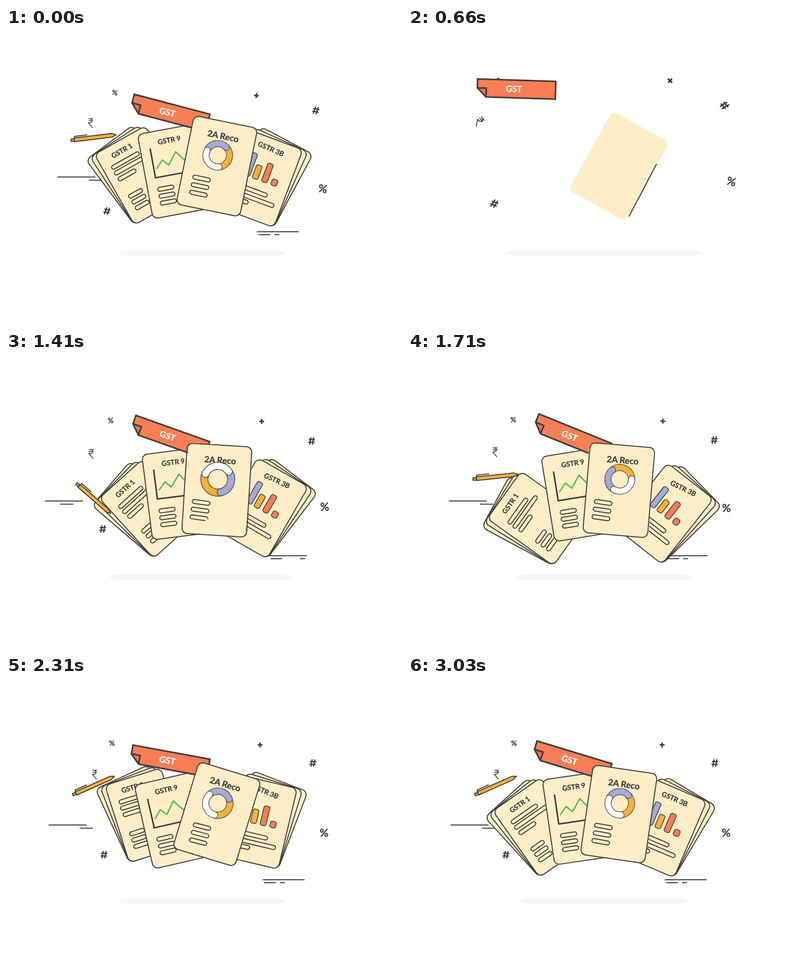
These frames come from a looping animation (800x600 px, 3.06 s). An HTML page:

```html
<!DOCTYPE html>
<html lang="en">
<head>
<meta charset="utf-8">
<title>GST returns</title>
<style>
  html, body { margin: 0; width: 100%; height: 100%; overflow: hidden; background: #fff; }
  svg { display: block; width: 800px; height: 600px; color: #3a3a3a; }
  text { font-family: Lato, "Open Sans", sans-serif; font-weight: 700; text-anchor: middle;
    fill: currentColor; stroke: currentColor; stroke-width: .3px; }
  .line { fill: none; stroke: #3d3d3d; stroke-width: 2; stroke-linecap: round; stroke-linejoin: round; }
  .card { fill: #feeec7; stroke: #3d3d3d; stroke-width: 2; }
</style>
</head>
<body>
<svg id="stage" viewBox="0 0 800 600"></svg>
<script>
const LOOP = 3060, STEP = 30;
const INK = '#3d3d3d', CREAM = '#feeec7', CORAL = '#f97e55', AMBER = '#f9b034', LILAC = '#a5a9d4', GREEN = '#55b95f';

const clamp = v => Math.max(0, Math.min(1, v));
const span = (t, start, length) => clamp((t - start) / length);
const remain = (t, start, length) => (1 - span(t, start, length)) ** 2;
const smooth = p => (1 - Math.cos(Math.PI * p)) / 2;
const backOut = p => 1 + 3.1 * (p - 1) ** 3 + 2.1 * (p - 1) ** 2;

// Damped swing: starts at full size and turns round every `half` ms.
function swing(t, start, size, half, decay) {
  const age = Math.max(0, t - start);
  return size * Math.exp(-age / decay) * Math.cos(Math.PI * age / half);
}

// Pose of a part whose corner lies at (dx, dy) from a pivot when turned by `base` degrees.
function around(px, py, dx, dy, base, angle) {
  const a = (angle - base) * Math.PI / 180, c = Math.cos(a), s = Math.sin(a);
  return [px + dx * c - dy * s, py + dx * s + dy * c, angle];
}

const group = (id, body) => `<g id="${id}">${body}</g>`;
const label = (s, x, y, size, extra = '') =>
  `<text x="${x}" y="${y}" dy=".35em" font-size="${size}" ${extra}>${s}</text>`;
const box = (x, y, w, h, r, attrs) => `<rect x="${x}" y="${y}" width="${w}" height="${h}" rx="${r}" ${attrs}/>`;

function pill(x, y, w, id = '') {
  const r = 4, l = x - w / 2, e = x + w / 2;
  return `<path id="${id}" class="line" pathLength="1" d="M${e} ${y}A${r} ${r} 0 0 0 ${e - r} ${y - r}
    H${l + r}A${r} ${r} 0 0 0 ${l + r} ${y + r}H${e - r}A${r} ${r} 0 0 0 ${e} ${y}"/>`;
}
const threePills = (x, y, gap, w, id) => [0, 1, 2].map(i => pill(x, y + gap * i, w, id ? id + i : '')).join('');

function ringArc(color, from, to) {
  const at = a => [23.7 * Math.cos(a * Math.PI / 180), 23.7 * Math.sin(a * Math.PI / 180)].join(' ');
  const d = `M${at(from)}A23.7 23.7 0 0 1 ${at(to)}`;
  const stroke = (c, w) => `<path d="${d}" fill="none" stroke="${c}" stroke-width="${w}" stroke-linecap="round"/>`;
  return stroke('#4c4a50', 14) + stroke(color, 11.4);
}

// Three sheets fanned about a shared bottom corner.
function pile(x, h, turn, body) {
  return [2, 1, 0].map(i =>
    `<g transform="rotate(${turn * i})">${box(x, -h, 118, h, 11, 'class="card"')}</g>`).join('') + body;
}

const bar = (x, h, color) =>
  box(x - 6, -79 - h, 12, h, 3.5, `fill="${color}" stroke="${INK}" stroke-width="1.6"`);

const hash = `<path class="line" style="stroke-width:2.5;stroke-linecap:butt"
  d="M-1.5 -7.5L-4 7.5M4 -7.5L1.5 7.5M-6 -2.7H6.8M-6.8 2.7H6"/>`;
const plus = `<path class="line" style="stroke-width:3;stroke-linecap:butt" d="M-5 0H5M0 -5V5"/>`;
const percent = size => label('%', 0, 0, size);

// Each symbol floats along (dx, dy) after it has arrived at (x, y).
const symbols = [
  { art: percent(14.5), x: 211, y: 139, dx: 9, dy: -8 },
  { art: plus, x: 517, y: 141, dx: -11, dy: -4 },
  { art: hash, x: 617, y: 181, dx: 9, dy: -14 },
  { art: percent(22), x: 644, y: 314, dx: -4, dy: 12 },
  { art: hash, x: 195, y: 358, dx: 9, dy: 13 }
];

const longPile = pile(0, 164, -3.6,
  label('GSTR 1', 52, -143.5, 14) +
  pill(48.5, -122.5, 63) + pill(55.5, -109.5, 79) + pill(37, -95.5, 40) +
  threePills(33.5, -54.5, 13.5, 31));

const barPile = pile(-118, 168, 3.8,
  group('barTitle', label('GSTR 3B', 0, 0, 14)) +
  bar(-88, 49, LILAC) + bar(-70.5, 29, AMBER) + bar(-50.5, 40, CORAL) + bar(-30.5, 13, CORAL) +
  pill(-70, -55.5, 70) + pill(-60, -40.5, 90) + pill(-85, -28.5, 38));

const chartCard = box(0, -174, 131, 174, 11, 'class="card"') +
  label('GSTR 9', 61, -151, 14) +
  `<path id="axis" class="line" style="stroke-width:3" pathLength="1" d="M20 -140V-81H90"/>
   <path id="graph" class="line" style="stroke:${GREEN};stroke-width:2.8" pathLength="1"
     d="M26 -99L40 -114L51 -101.5L69.5 -125.5L86 -103"/>` +
  threePills(36.5, -56.5, 14.2, 33);

const ribbon = `<path fill="${CORAL}" d="M-79 -18H79V18H-61L-79 0Z"/>
  <path fill="#e9734f" d="M-79 0H-61V18Z"/>
  <path fill="none" stroke="${INK}" stroke-width="3.2" d="M-79 -18H79V18H-61L-79 0ZM-79 0H-61V18"/>` +
  label('GST', -5, 0, 17.5, 'color="#fff"');

const pen = `<g stroke="${INK}" stroke-width="2" stroke-linejoin="round" fill="${AMBER}">
  <path d="M-46 -2.5H-39V2.5H-46Z"/><path d="M-39 -3.7H37L46 0L37 3.7H-39Z"/>
  <path fill="none" d="M-38 -3.7V-7H-12"/></g>`;

const stage = document.getElementById('stage');
stage.innerHTML =
  box(0, 450, 0, 12, 0, 'id="shadow" fill="#f6f6f6"') +
  `<path id="leftLines" class="line"/><path id="rightLines" class="line"/>` +
  symbols.map((s, i) => group('symbol' + i, s.art)).join('') +
  group('longPile', longPile) + group('barPile', barPile) + group('chartCard', chartCard) +
  group('ribbon', ribbon) +
  group('frontFill', box(-65.5, -91.5, 131, 183, 11, `fill="${CREAM}"`)) +
  group('frontTitle', label('2A Reco', 0, 0, 17.5)) +
  group('ring', ringArc(AMBER, -45, 85) + ringArc(LILAC, -150, -42) + ringArc('#fff', 84, 206)) +
  group('frontPills', threePills(0, -15.7, 15.7, 36, 'frontPill')) +
  group('frontEdge', `<path id="edge" class="line" pathLength="1" d="M65.5 80.5V-80.5A11 11 0 0 0 54.5 -91.5
    H-54.5A11 11 0 0 0 -65.5 -80.5V80.5A11 11 0 0 0 -54.5 91.5H54.5A11 11 0 0 0 65.5 80.5"/>`) +
  group('pen', pen) +
  group('rupee', `<path class="line" style="stroke-width:1.7;stroke-linecap:butt"
    d="M-4.5 -9H5M-4.5 -5H5M-4.5 -9H-1.5A4 4 0 0 1 -1.5 -.8H-4.5L4 9.5"/>`) +
  box(0, 597, 800, 3, 0, 'fill="#fff"');

const el = {};
stage.querySelectorAll('[id]').forEach(node => { if (node.id) el[node.id] = node; });

function place(id, [x, y, angle = 0], scale = 1) {
  el[id].setAttribute('transform', `translate(${x} ${y}) rotate(${angle}) scale(${scale})`);
}
function show(id, on) { el[id].setAttribute('visibility', on ? 'inherit' : 'hidden'); }
function draw(id, p) {
  show(id, p > 0);
  el[id].setAttribute('stroke-dasharray', p < 1 ? `${p} 2` : 'none');
}
function enter(id, t, start, pose) {
  show(id, t >= start);
  place(id, pose);
}
function flyOut(id, t, start, x, y, angle) {
  const p = span(t, start, 420), k = backOut(p);
  show(id, p > 0);
  place(id, [430 + (x - 430) * k, 380 + (y - 380) * k, angle + 90 * (1 - p)], Math.max(0, k));
}

function frontPose(t, sway) {
  const angle = 11.5 + sway * swing(t, 760, 14, 800, 1700) + .022 * Math.max(0, 760 - t);
  return [426, 740 - 460 * smooth(span(t, 90, 480)), angle];
}

function drawFront(t, sway) {
  const pose = frontPose(t, sway), angle = pose[2];
  enter('frontFill', t, 90, frontPose(t < 600 ? t : Math.max(600, t - 80), sway));
  place('frontEdge', pose);
  draw('edge', span(t, 570, 460));
  place('frontTitle', [430 + .75 * angle, 219.5, angle], span(t, 1050, 270));
  place('frontPills', [392, 320.5, 6 + angle / 2]);
  for (let i = 0; i < 3; i++) draw('frontPill' + i, span(t, 950 + 35 * i, 430));

  const pulse = Math.sin(Math.PI * span(t, 2100, 900));
  const size = t > 1000 ? backOut(span(t, 1000, 770)) + .05 * pulse : 0;
  place('ring', [427.8, 258, 360 * smooth(span(t, 1000, 1050)) + 32 * pulse], Math.max(0, size));
}

function drawCards(t, sway) {
  const tilt = -10.5 - sway * swing(t, 620, 4, 800, 4000) + 45 * remain(t, 690, 300);
  const behind = 1 - smooth(span(t, 990, 360));
  enter('chartCard', t, 690, around(400 + 32 * behind, 366 + 6 * behind, -103, 20, -10, tilt));
  draw('axis', span(t, 750, 480));
  draw('graph', span(t, 850, 440));

  const left = -29.5 + sway * swing(t, 950, 53.6, 740, 1000);
  enter('longPile', t, 1050, around(353 + 100 * remain(t, 1050, 700), 340, -96, 55, -27, left));
  const right = 20.5 - sway * swing(t, 930, 42, 770, 900);
  enter('barPile', t, 1050, around(444 - 100 * remain(t, 1050, 350), 328, 92, 82, 24, right));
  place('barTitle', [-61, -147, (24 - right) * .85]);
}

function drawFlyers(t, sway) {
  const angle = 14.8 - sway * swing(t, 880, 13, 780, 1500);
  enter('ribbon', t, 390, [331 - 370 * remain(t, 390, 600), 172 - 110 * remain(t, 390, 800), angle]);

  const turn = remain(t, 1140, 900), away = 600 * Math.max(0, turn - .49) ** 2;
  enter('pen', t, 1140,
    [177 - away, 222 + 75 * Math.sin(Math.PI * turn) - 2 * away, -7 - 17 * sway + 133 * turn]);
}

function drawBackdrop(t, sway) {
  const afloat = span(t, 1300, 700), drift = 1 - sway * (1 - .33 * afloat);
  symbols.forEach((s, i) =>
    flyOut('symbol' + i, t, 310 + 40 * ((i + 2) % 5), s.x + s.dx * drift, s.y + s.dy * drift, 10 * drift * drift));
  const lift = sway * afloat;
  flyOut('rupee', t, 480, 171 + 8 * lift, 193 + 15 * sway - 8 * lift, 0);

  const half = 198 * span(t, 300, 300) - 29 * span(t, 990, 1050);
  Object.entries({ x: 396 - half, width: 2 * half, rx: half * .15, ry: 6 })
    .forEach(([name, v]) => el.shadow.setAttribute(name, v));

  const far = delay => 322 * remain(t, 840 + delay, 570);
  const left = 78 + 27 * drift, right = 525 - 17 * drift;
  show('leftLines', t > 840);
  el.leftLines.setAttribute('d', `M${left - far(0)} 302h75M${left + 63 - far(180)} 308.5h25`);
  show('rightLines', t > 840);
  el.rightLines.setAttribute('d',
    `M${right + far(0)} 413h83M${right + 3 + far(90)} 419h22M${right + 35 + far(190)} 419h8.5`);
}

// The loop opens on the finished scene at rest, then builds it up again.
function render(time) {
  const t = time || LOOP, sway = time ? 1 : 0;
  [drawBackdrop, drawCards, drawFlyers, drawFront].forEach(part => part(t, sway));
}

function tick() {
  render(Math.floor(performance.now() % LOOP / STEP) * STEP);
  requestAnimationFrame(tick);
}
tick();
</script>
</body>
</html>
```
